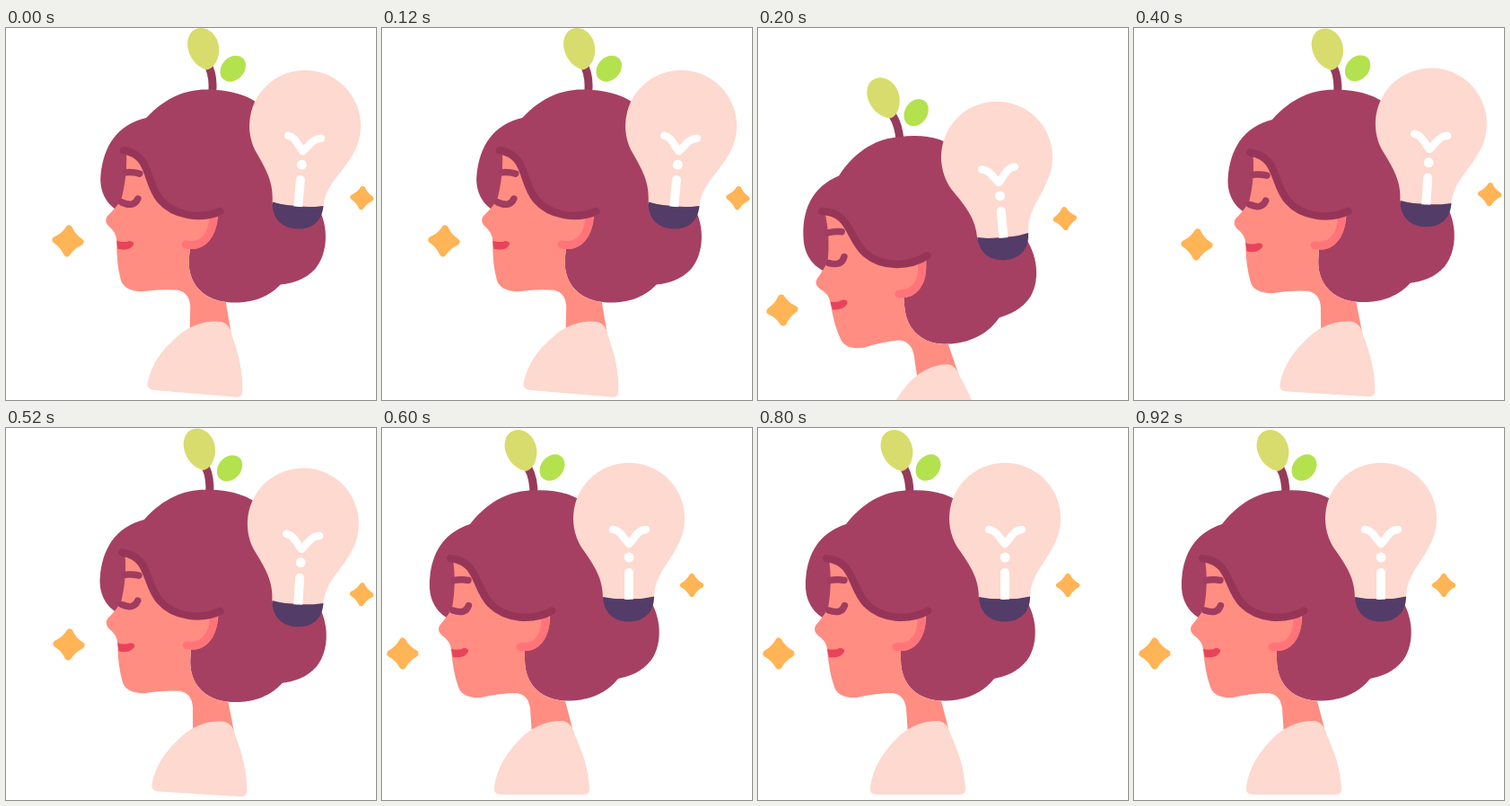
These frames come from a looping animation (412x414 px, 1 s). An HTML page:

```html
<!DOCTYPE html>
<html lang="en">
<head>
<meta charset="utf-8">
<title>Bright idea</title>
<style>
  html, body { margin: 0; width: 100%; height: 100%; overflow: hidden; background: #fff; }
  svg { display: block; width: 100%; height: 100%; }
  .line { fill: none; stroke-linecap: round; stroke-linejoin: round; }
</style>
</head>
<body>
<svg viewBox="0 0 412 414">
  <defs>
    <path id="star" d="M0-13.500Q4.500-5 13.500 0Q4.500 5 0 13.500Q-4.500 5-13.500 0Q-4.500-5 0-13.500Z"
      fill="#ffb455" stroke="#ffb455" stroke-width="8" stroke-linejoin="round"/>
  </defs>
  <g id="scene">
    <!-- sprout -->
    <path class="line" d="M169 74Q169 56 163 45" stroke="#963a5b" stroke-width="9"/>
    <path d="M160 48C146 45 137 32 136.500 19C137 7 144 2 152 2C164 3 172 14 172.500 27C172 38 167 47 160 48Z" fill="#d8dc6c"/>
    <ellipse rx="12.500" ry="16" transform="translate(189.500 44) rotate(38)" fill="#b3e24e"/>

    <!-- hair -->
    <path d="M76 213C60 206 53 190 53 176C53 142 67 117 98 107C120 79 145 69.500 168 69.500C217 67 250 88 260 150L290 180C313 205 313 240 300 258C289 272 276 276 263 279C246 300 222 304 205 303.500C178 303 159 286 159 258V240L100 180Z" fill="#a64062"/>
    <!-- face, neck and ear -->
    <path d="M79 146C82 165 81 185 78 200Q75 207 64 220Q61 226 67 231Q76 237 77 246Q79 272 85 288Q89 301 110 300Q132 295 150 295Q163 297 165 312L167 342H214L204 303.500C178 303 159 286 159 258V248C175 249 189 232 187 204C168 216 138 213 121 196C103 178 108 148 79 146Z" fill="#ff8d82"/>
    <path class="line" d="M154 243.500C172 246 183 232 182 210" stroke="#ff7478" stroke-width="9"/>
    <path class="line" d="M76 145C108 148 103 178 121 196C138 213 168 215 189 203.500" stroke="#963558" stroke-width="8.500"/>
    <path class="line" d="M80 169.500Q89 168 96 169.500M79 203Q93 208 96.500 197.500" stroke="#a03c5f" stroke-width="7.500"/>
    <path d="M77 246Q85 248 91 245Q97 245 96 249C93 255 86 256 79 255Z" fill="#e8435a"/>
    <path d="M125 400C129 372 145 355 158 342C172 330 187 325 202 326Q211 328 214 340C224 362 230 380 231 402Q231 408 224 408H133Q124 408 125 400Z" fill="#fdd9cf"/>

    <!-- light bulb -->
    <path d="M246 190C246 167 237 154 221.500 132A62 62 0 1 1 328.500 132C319 152 303 164 303 190Z" fill="#fdd9cf"/>
    <g class="line" stroke="#fff">
      <path d="M257 113C266 114 268 122 275 129C282 122 284 114 294 113" stroke-width="8.500"/>
      <path d="M275 161V192" stroke-width="10"/>
    </g>
    <circle cx="275" cy="144" r="5.500" fill="#fff"/>
    <path d="M246 188Q275 194 303 187.500C303 206 291 215.500 275 215.500C258 215.500 247 206 246 188Z" fill="#533c68"/>

    <use href="#star" x="23" y="251"/>
    <use href="#star" transform="translate(345 175) scale(.75)"/>
  </g>
</svg>
<script>
  const scene = document.getElementById("scene");
  const step = 200;
  // Left star position and tilt of the whole figure for each hold.
  const poses = [[69, 237, 4.95], [27, 314, -4.66], [70, 241, 3.56], [23, 251, 0], [23, 251, 0]];
  const begin = performance.now();

  function draw(now) {
    const i = Math.floor(Math.max(0, now - begin) / step) % poses.length;
    const [x, y, tilt] = poses[i];
    scene.setAttribute("transform", `translate(${x} ${y}) rotate(${tilt}) translate(-23 -251)`);
    requestAnimationFrame(draw);
  }
  draw(begin);
</script>
</body>
</html>
```
